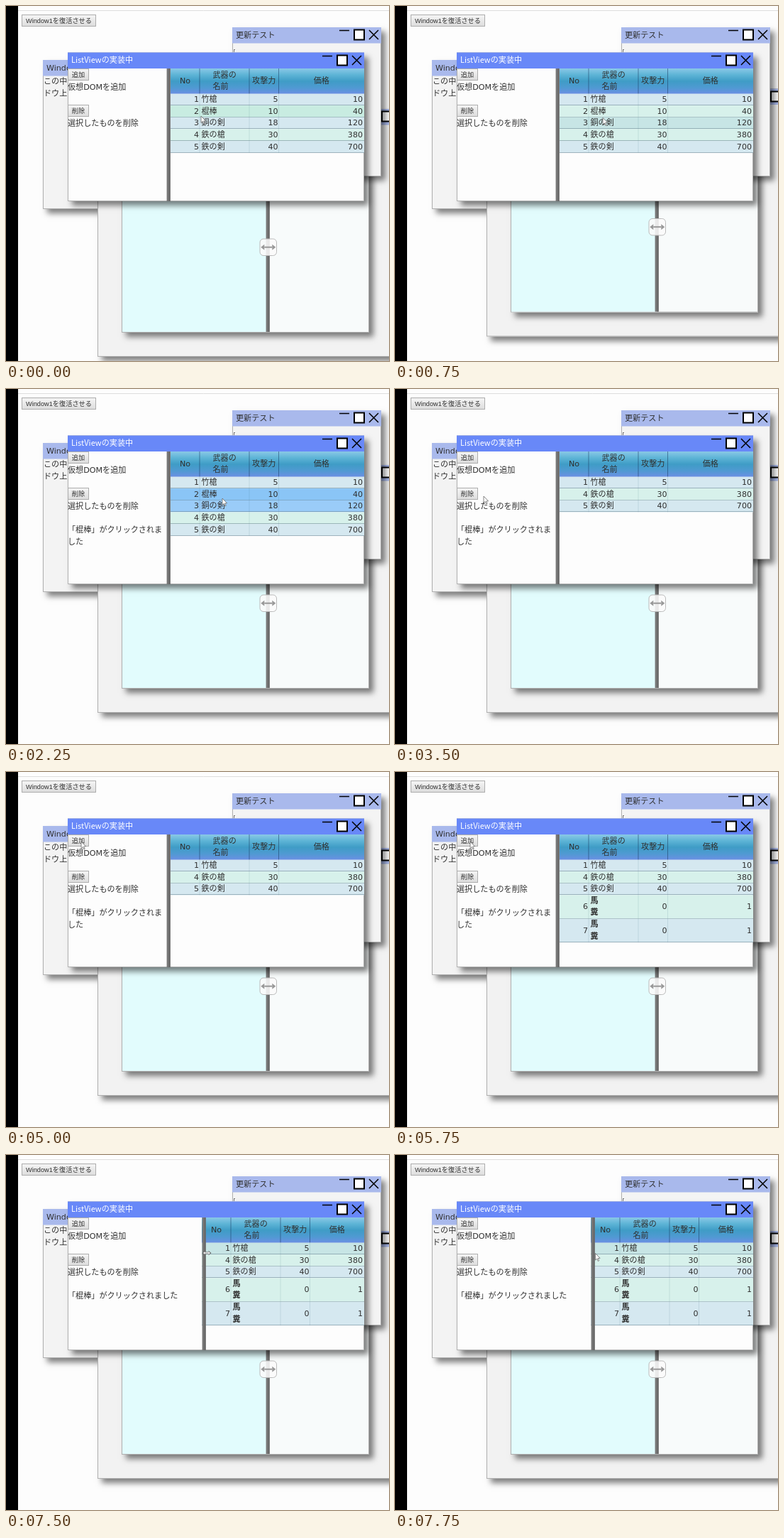
Recreate the animation shown at these times as an HTML page with a canvas. Size 540x500 px, loop 8000 ms.

```html
<!DOCTYPE html>
<html lang="ja">
<head>
<meta charset="utf-8">
<style>
html, body { margin: 0; width: 100%; height: 100%; overflow: hidden; background: #fdfdfd; }
canvas { display: block; }
</style>
</head>
<body>
<canvas id="stage" width="540" height="500"></canvas>
<script>
const c = document.getElementById('stage').getContext('2d');
const LOOP = 8000, STEP = 250;
const UI = '11.1px "DejaVu Sans", "Noto Sans CJK JP", sans-serif';
const TITLE = '500 11.1px "Noto Sans CJK JP", sans-serif';
const BOLD = 'bold 11.1px "Noto Sans CJK JP", sans-serif';
const SMALL = '9.2px "Liberation Sans", "Noto Sans CJK JP", sans-serif';
const ROW = 16.65;

const CLICK_SWORD = 1250, CLICK_CLUB = 2000, DELETE = 3250, ADD = [5250, 5750];
// time, x, y of the pointer tip
const POINTER = [[0, 275, 155], [1250, 305, 159], [1500, 305, 159], [2000, 305, 154], [2500, 305, 154],
  [3000, 105, 147], [3250, 105, 147], [3500, 125, 151], [4250, 125, 151], [4750, 106, 98],
  [6000, 106, 98], [7000, 235, 138], [7500, 283, 138], [8000, 282, 139]];
const ITEMS = [[1, '竹槍', 5, 10], [2, '棍棒', 10, 40], [3, '銅の剣', 18, 120],
  [4, '鉄の槍', 30, 380], [5, '鉄の剣', 40, 700]];

const ramp = (t, a, b) => Math.min(1, Math.max(0, (t - a) / (b - a)));
const mix = (a, b, k) => a + (b - a) * k;

function rect(x, y, w, h, fill) {
  c.fillStyle = fill;
  c.fillRect(x, y, w, h);
}

function line(color, width, ...p) {
  c.strokeStyle = color;
  c.lineWidth = width;
  c.beginPath();
  for (let i = 0; i < p.length; i += 4) {
    c.moveTo(p[i], p[i + 1]);
    c.lineTo(p[i + 2], p[i + 3]);
  }
  c.stroke();
}

// y is the middle of the line of text
function text(s, x, y, align = 'left', font = UI, color = '#303030') {
  c.font = font;
  c.textAlign = align;
  c.fillStyle = color;
  c.fillText(s, x, Math.round(y + 4));
}

function fade(x, y, h, ...colors) {
  const g = c.createLinearGradient(x, y, x, y + h);
  colors.forEach((k, i) => g.addColorStop(i / (colors.length - 1), k));
  return g;
}

function button(label, x, y, w) {
  rect(x, y, w, 17, fade(x, y, 17, '#f6f6f6', '#dcdcdc'));
  c.strokeStyle = '#adadad';
  c.lineWidth = 1;
  c.strokeRect(x + .5, y + .5, w - 1, 16);
  text(label, x + w / 2, y + 8, 'center', SMALL);
}

function frame(x, y, w, h, fill) {
  c.save();
  c.shadowColor = 'rgba(0,0,0,.5)';
  c.shadowBlur = 8;
  c.shadowOffsetX = c.shadowOffsetY = 6;
  rect(x, y, w, h, fill);
  c.restore();
  c.strokeStyle = '#b0b0b0';
  c.lineWidth = 1;
  c.strokeRect(x + .5, y + .5, w - 1, h - 1);
}

function win(title, x, y, w, h, fill, bar = '#a9b9ec', font = UI, color = '#303030') {
  frame(x, y, w, h, fill);
  rect(x, y, w, 22.5, bar);
  text(title, x + 5, y + 10.5, 'left', font, color);
  const r = x + w, top = Math.round(y);
  line('#000', 1.5, r - 59, top + 4.5, r - 45, top + 4.5,
    r - 17, top + 4, r - 4, top + 17, r - 4, top + 4, r - 17, top + 17);
  rect(r - 39, top + 2.5, 16, 16, '#000');
  rect(r - 37, top + 4.5, 12, 12, '#fff');
}

function doubleArrow(x, y, r, head, color, width) {
  line(color, width, x - r + head, y, x + r - head, y);
  c.fillStyle = color;
  c.beginPath();
  for (const s of [-1, 1]) {
    c.moveTo(x + s * r, y);
    c.lineTo(x + s * (r - head), y - head * .8);
    c.lineTo(x + s * (r - head), y + head * .8);
    c.closePath();
  }
  c.fill();
}

function splitter(x, y, h) {
  rect(x, y, 5, h, '#777');
  rect(x + 3, y, 2, h, '#666');
}

function rearWindow(dy) {
  win('', 129, 145 + dy, 439, 349, '#f2f2f2');
  frame(163, 200 + dy, 349, 260, '#f8fbfb');
  rect(164, 200 + dy, 203, 259, '#e2fcfd');
  splitter(366.6, 201 + dy, 258);
  c.beginPath();
  c.roundRect(358, 328 + dy, 23.5, 23.5, 5);
  c.fillStyle = 'rgba(250,250,250,.88)';
  c.fill();
  c.strokeStyle = '#bbb';
  c.lineWidth = 1;
  c.stroke();
  doubleArrow(369.8, 339.7 + dy, 10.5, 5, '#999', 2);
}

function table(t, left, px, py) {
  const edges = [left, left + 41, left + 111, left + 152.5, 505];
  const mid = i => (edges[i] + edges[i + 1]) / 2;
  rect(left, 88, 505 - left, 36, fade(left, 88, 36, '#8ac8e6', '#5db4d6', '#3f9cc6', '#4f9ad2', '#6c8fe4'));
  text('No', mid(0), 105, 'center');
  text('武器の', left + 59.5, 97);
  text('名前', left + 59.5, 113);
  text('攻撃力', mid(2), 105, 'center');
  text('価格', mid(3), 105, 'center');
  edges.slice(1, 4).forEach(x => line('rgba(20,50,90,.5)', 1, x, 88, x, 124));

  const rows = ITEMS.filter(r => t < DELETE || (r[0] !== 2 && r[0] !== 3));
  ADD.forEach((at, i) => { if (t >= at) rows.push([6 + i, '馬糞', 0, 1]); });
  let y = 123.5;
  rows.forEach(([no, name, power, price], i) => {
    const tall = no > 5, h = tall ? 2 * ROW : ROW, cy = y + h / 2 - .7;
    const picked = (no === 3 && t >= CLICK_SWORD) || (no === 2 && t >= CLICK_CLUB);
    const hover = px > left + 6 && py >= y && py < y + h;
    rect(left, y, 505 - left, h, picked ? '#9accf8' : i % 2 ? '#d7f1eb' : '#d5e8f0');
    if (hover) rect(left, y, 505 - left, h, picked ? 'rgba(100,180,240,.3)' : 'rgba(165,220,203,.3)');
    text(no, edges[1] - 1, cy, 'right');
    if (tall) [...name].forEach((ch, k) => text(ch, edges[1] + 2.5, y + ROW * (k + .5) - 1, 'left', BOLD));
    else text(name, edges[1] + 2.5, cy);
    text(power, edges[3] - 1, cy, 'right');
    text(price, 503, cy, 'right');
    edges.slice(1, 4).forEach(x => line('rgba(60,110,130,.15)', 1, x, y, x, y + h));
    y += h;
    line('rgba(80,110,125,.45)', 1, left, Math.round(y) - .5, 505, Math.round(y) - .5);
  });
}

function leftPane(t, split) {
  button('追加', 87, 88, 30);
  text('仮想DOMを追加', 87, 114);
  button('削除', 87, 139, 30);
  text('選択したものを削除', 87, 165);
  if (t < CLICK_SWORD) return;
  const message = `「${t < CLICK_CLUB ? '銅の剣' : '棍棒'}」がクリックされました`;
  const perLine = Math.floor((split - 87) / 11.1);
  for (let i = 0; i * perLine < message.length; i++)
    text(message.slice(i * perLine, (i + 1) * perLine), 87, 198 + i * ROW);
}

function pointerAt(t) {
  const i = POINTER.findIndex(p => p[0] > t);
  const a = POINTER[i - 1], b = POINTER[i], k = ramp(t, a[0], b[0]);
  return [mix(a[1], b[1], k), mix(a[2], b[2], k)];
}

function arrow(x, y) {
  c.beginPath();
  [[0, 0], [0, 9.5], [2.2, 7.5], [3.8, 11], [5.2, 10.3], [3.7, 7], [6.6, 6.8]]
    .forEach(([dx, dy]) => c.lineTo(x + dx, y + dy));
  c.closePath();
  c.fillStyle = '#fff';
  c.fill();
  c.strokeStyle = '#666';
  c.lineWidth = .8;
  c.stroke();
}

function draw(t) {
  const [px, py] = pointerAt(t);
  const drag = ramp(t, 7000, 7500), split = mix(226.6, 276.6, drag);

  rect(0, 0, 540, 500, '#fdfdfd');
  line('#ddd', 1, 17, 6.5, 540, 6.5);
  button('Window1を復活させる', 22, 12, 105);

  win('Window1', 52, 76, 210, 210, '#f3f3f3');
  text('この中', 53, 106);
  text('ドウ上', 53, 123);
  rearWindow(-38 * ramp(t, 0, 1000));
  win('更新テスト', 319, 30, 210, 210, '#f4f4f4');
  line('#777', 1, 321.5, 61, 321.5, 65, 321, 61.5, 323, 61.5);

  win('ListViewの実装中', 87, 65.5, 418, 209.5, '#fdfdfd', '#6888f8', TITLE, '#fff');
  leftPane(t, split);
  table(t, mix(232, 276, drag), px, py);
  splitter(split, 88, 187);

  if (t >= 7000 && t < 7750) {
    doubleArrow(px, py, 6.5, 4, '#666', 3);
    doubleArrow(px, py, 5, 2.5, '#fff', 1.4);
  } else arrow(px, py);

  rect(0, 0, 17, 500, '#000');
}

function tick(now) {
  draw(Math.floor(now % LOOP / STEP) * STEP);
  requestAnimationFrame(tick);
}
requestAnimationFrame(tick);
</script>
</body>
</html>
```
